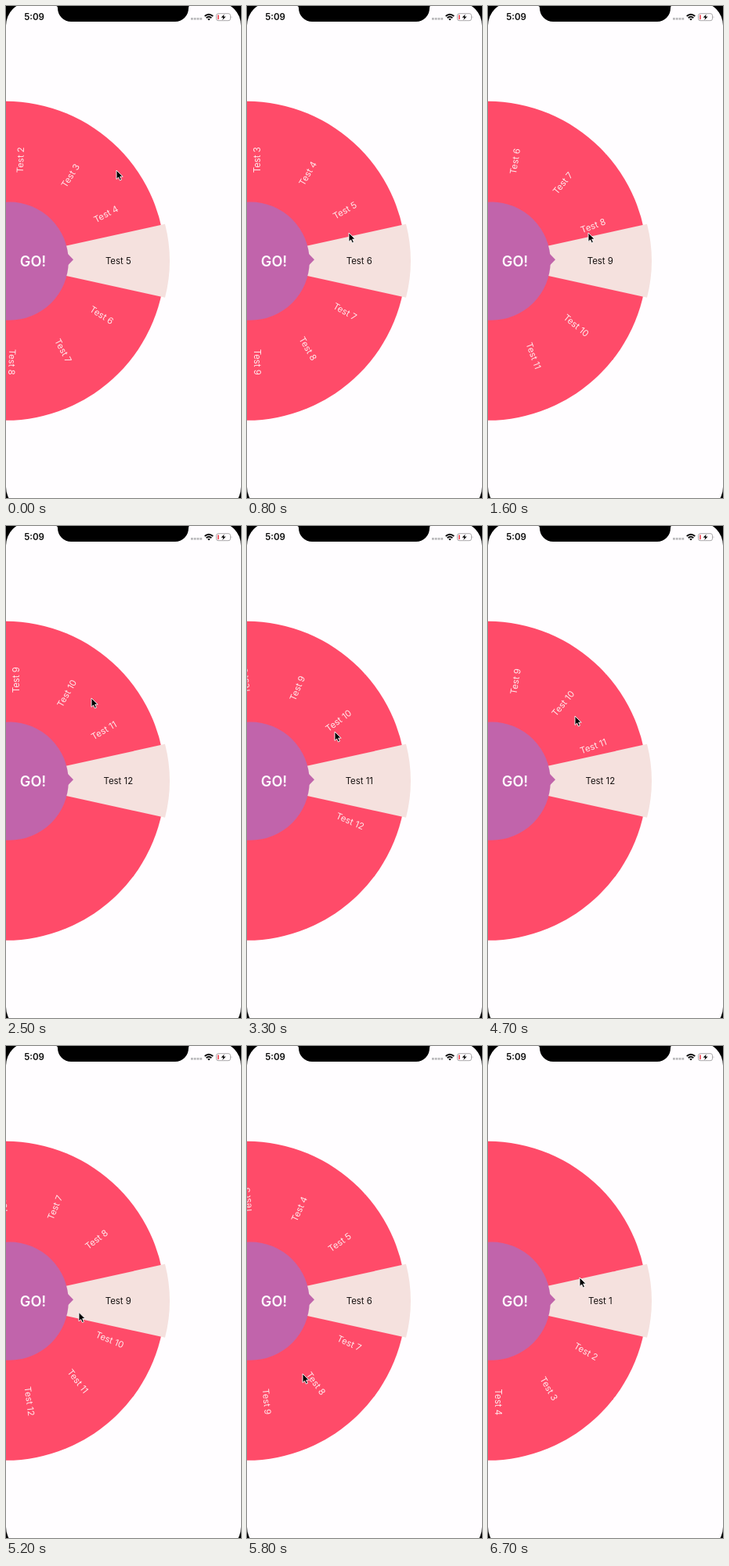
Write an HTML page that moves like this. It is 300 by 629 pixels and loops after 7 s.

```html
<!DOCTYPE html>
<html lang="en">
<head>
<meta charset="utf-8">
<title>Wheel picker</title>
<style>
  html, body { margin: 0; width: 100%; height: 100%; overflow: hidden; background: #000; }
  svg { display: block; width: 100%; height: 100%; font-family: Inter, Roboto, "Liberation Sans", sans-serif; }
  .label { font-size: 11.4px; text-anchor: middle; fill: #ffe9ec; }
  .picked { fill: #15100f; }
  .go { font-size: 18.2px; font-weight: 600; text-anchor: middle; fill: #fff; }
  .time { font-size: 11.5px; font-weight: 600; text-anchor: middle; fill: #0b0b0b; }
</style>
</head>
<body>
<svg viewBox="0 0 300 629">
  <rect y="-5" width="300" height="650" rx="30" fill="#fffdff"/>

  <g id="status">
    <path d="M64 0H234Q233 0 233 3A17 17 0 0 1 216 20H83A17 17 0 0 1 66 3Q66 0 64 0Z"/>
    <text class="time" x="36" y="18">5:09</text>
    <path d="M236 16.4H250.4" stroke="#b9b9bb" stroke-width="2.8" stroke-dasharray="2.8 1"/>
    <g fill="none" stroke="#0b0b0b" stroke-width="1.8">
      <path d="M253.7 13Q259 8.4 264.3 13"/>
      <path d="M255.7 15.2Q259 12.3 262.3 15.2"/>
    </g>
    <path d="M257.2 16.7Q259 15.3 260.8 16.7L259 18.5Z"/>
    <rect x="268.5" y="9.7" width="18" height="9" rx="2.5" fill="none" stroke="#aaa8aa"/>
    <path d="M287.7 12.7q1.6 1.5 0 3z" fill="#aaa8aa"/>
    <rect x="270" y="11.2" width="1.8" height="6" rx=".8" fill="#f0525c"/>
    <path d="M278.8 10.6L274.6 14.8H277.3L276.3 18L280.6 13.6H277.8Z"/>
  </g>

  <circle cx="-.9" cy="325.8" r="204" fill="#ff4b69"/>
  <path d="M-10 325.8L203 278.8A190 190 0 0 1 203 372.8Z" fill="#f5e1de"/>
  <circle cx="4.2" cy="326.2" r="75.6" fill="#c164ab"/>
  <path d="M78.5 316.5L86 324.2L78.5 332Z" fill="#c164ab"/>
  <text class="go" x="34.5" y="333">GO!</text>

  <g id="labels"></g>
  <text id="picked" class="label picked" x="143.3" y="330"></text>

  <path id="cursor" d="M0 0V11.4L2.6 9L4.4 13L6.4 12.1L4.7 8.1H8.2Z"
        stroke="#fff" stroke-width=".9" stroke-linejoin="round"/>
</svg>
<script>
  const LOOP = 7000, STEP = 100, COUNT = 12, GAP = 30;

  // Turning points of the hand: time, wheel position in items, pointer x, y
  const turns = [
    [0, 4.92, 141, 210],
    [300, 6, 138, 161],
    [800, 6, 130, 290],
    [1300, 8, 131, 200],
    [1600, 8.68, 128, 290],
    [1800, 13, 118, 2],
    [2500, 12, 109, 220],
    [3300, 11.22, 112, 263],
    [3800, 11.05, 112, 270],
    [4700, 11.67, 111, 243],
    [4900, 12, 110, 220],
    [5500, 6.5, 76, 461],
    [5800, 6.18, 71, 419],
    [6100, 6, 112, 205],
    [6500, 0.95, 110, 375],
    [LOOP - 300, 1, 117, 296]
  ];
  const holds = [[800, 1000], [5500, 5800]];

  const get = id => document.getElementById(id);
  const picked = get("picked"), cursor = get("cursor");
  const labels = Array.from({ length: COUNT }, (_, i) => {
    const el = document.createElementNS("http://www.w3.org/2000/svg", "text");
    el.setAttribute("class", "label");
    el.setAttribute("x", 142.3);
    el.setAttribute("y", 330);
    el.textContent = `Test ${i + 1}`;
    return get("labels").appendChild(el);
  });

  const ease = u => u * u * (3 - 2 * u);

  function poseAt(time) {
    const hold = holds.find(([from, to]) => time >= from && time < to);
    const t = hold ? hold[0] : time;
    const i = turns.findIndex(k => k[0] > t);
    if (i < 0) return turns[turns.length - 1].slice(1);
    const [t0, ...a] = turns[i - 1], [t1, ...b] = turns[i];
    const u = ease((t - t0) / (t1 - t0));
    return a.map((v, j) => v + (b[j] - v) * u);
  }

  function draw(t) {
    const [wheel, x, y] = poseAt(t);
    const pos = Math.min(COUNT, wheel);
    const sel = Math.max(1, Math.round(pos));
    labels.forEach((el, i) => {
      const n = i + 1, away = Math.abs(n - sel);
      el.setAttribute("visibility", away > 0 && away < 5 ? "visible" : "hidden");
      el.setAttribute("transform", `rotate(${(n - pos) * GAP} 13 326)`);
    });
    picked.textContent = `Test ${sel}`;
    cursor.setAttribute("transform", `translate(${x} ${y})`);
  }

  let start;
  function tick(now) {
    start ??= now;
    const t = (now - start + 1) % LOOP;
    draw(Math.floor(t / STEP) * STEP);
    requestAnimationFrame(tick);
  }
  draw(0);
  requestAnimationFrame(tick);
</script>
</body>
</html>
```
